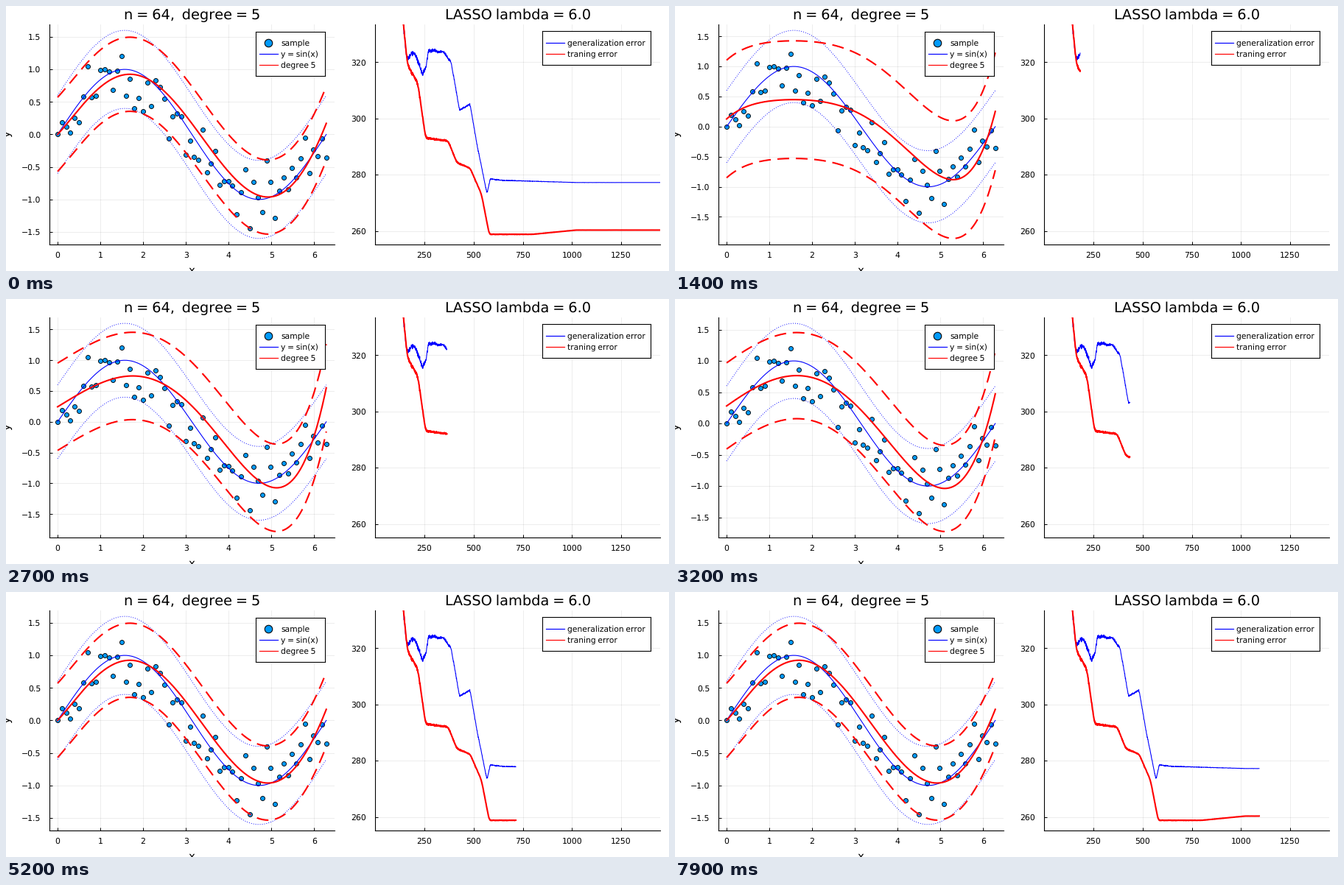
Animation, 900 px wide and 360 px high, one loop 8 s. Source, as a matplotlib script:

```python
import numpy as np
import matplotlib.pyplot as plt
from matplotlib.animation import FuncAnimation

W, H, DPI = 900, 360, 100
FRAMES, STEP, LAST = 80, 14, 1448
TOP, BOTTOM = 24.6, 324.3
PT = 72 / DPI                       # points per pixel
BLUE, RED, DOT = "#0000ff", "#ff0000", "#009afa"

plt.rcParams.update({
    "font.family": "DejaVu Sans",
    "text.hinting": "none",
    "text.kerning_factor": 6,
    "axes.linewidth": 1.1 * PT,
    "axes.axisbelow": True,
})

# step, start value, peak x, peak y, trough x, trough y, end value, band half-width
FIT = np.array([
    (0, 0, 1.0, 0, 5.5, 0, 0, .745),
    (98, .05, 1.0, .07, 5.5, -.515, -.38, .745),
    (240, .18, 1.96, .71, 5.16, -1.135, .69, .745),
    (434, .28, 1.64, .765, 5.10, -1.038, .474, .688),
    (532, .238, 1.57, .84, 5.01, -.982, .347, .652),
    (590, 0, 1.69, .925, 4.92, -.963, .17, .57)])

FALL = [(0, 450), (143, 333.5)]
TRAIN = FALL + [
    (164, 319), (216, 312.5), (256, 293), (370, 292), (415, 284.3),
    (482, 282.3), (540, 273), (579, 258.8), (800, 258.8), (1020, 260.3)]
GENERAL = FALL + [
    (160, 321), (185, 323.5), (210, 322), (240, 315.5), (257, 318),
    (271, 324.3), (347, 323.5), (385, 320), (428, 303), (482, 305),
    (516, 291), (568, 273.2), (584, 278.5), (640, 278), (1025, 277.2)]

rng = np.random.default_rng(7)
steps = np.arange(LAST + 1)
xs = np.linspace(0, 2 * np.pi, 200)
x_data = np.linspace(0, 2 * np.pi, 64)
y_data = np.sin(x_data) + np.clip(.3 * rng.standard_normal(64), -.58, .58)


def error_curve(points, window, jitter):
    """Rounded path through the points, with noise that dies out."""
    y = np.interp(steps, *zip(*points))
    y = np.convolve(np.pad(y, window // 2, mode="edge"),
                    np.ones(window) / window, mode="valid")
    return y + jitter * np.exp(-steps / 250) * rng.standard_normal(steps.size)


train = error_curve(TRAIN, 15, .5)
general = error_curve(GENERAL, 7, 1.1)


def quintic(y0, xa, ya, xb, yb, y1):
    """Degree 5 curve through both ends with flat points at a and b."""
    p = np.arange(6)
    ends = np.vander([0, xa, xb, xs[-1]], 6, increasing=True)
    flat = [p * np.power(float(x), np.maximum(p - 1, 0)) for x in (xa, xb)]
    coef = np.linalg.solve(np.vstack([ends, flat]), [y0, ya, yb, y1, 0, 0])
    return np.polynomial.polynomial.polyval(xs, coef)


def fit_at(step):
    *shape, band = [np.interp(step, FIT[:, 0], col) for col in FIT[:, 1:].T]
    return quintic(*shape), band + 3.15 * np.exp(-(step / 100) ** 1.6)


def box(x0, y0, x1, y1):
    return [x0 / W, 1 - y1 / H, (x1 - x0) / W, (y1 - y0) / H]


def narrow(text):
    """Use quarter-em word spaces."""
    return text.replace(" ", "\u2005")


fig = plt.figure(figsize=(W / DPI, H / DPI), dpi=DPI, facecolor="white")


def plot_axes(title):
    ax = fig.add_axes(box(60, TOP, 440, BOTTOM), label=title)
    ax.spines[["top", "right"]].set_visible(False)
    ax.set_title(narrow(title), fontsize=19.4 * PT, y=1, pad=7 * PT)
    ax.tick_params(direction="in", length=4 * PT, width=1 * PT, labelsize=10.9 * PT)
    ax.tick_params(axis="x", pad=9 * PT)
    ax.tick_params(axis="y", pad=12 * PT)
    ax.grid(color="black", alpha=.1, linewidth=.7 * PT)
    return ax


def line(ax, x, y, color, width, **kw):
    return ax.plot(x, y, color=color, lw=width * PT, **kw)[0]


def dots(ax, x, y, size, edge):
    ax.plot(x, y, "o", ms=size * PT, mfc=DOT, mec="black", mew=edge * PT)


def legend(x0, x1, rows):
    """Framed key; each row is a label with a line colour, or None for a dot."""
    w, h = x1 - x0, 15.2 * len(rows) + 15.2
    ax = fig.add_axes(box(x0, 34.5, x1, 34.5 + h), label=rows[0][0], zorder=5)
    ax.set(xlim=(0, w), ylim=(h, 0), xticks=[], yticks=[])
    for i, (label, color) in enumerate(rows):
        y = 15.2 * (i + 1)
        if color:
            line(ax, [5, 30], [y, y], color, 1.2)
        else:
            dots(ax, [17.3], [y], 10.5, 1.1)
        ax.text(34, y + 4, narrow(label), fontsize=10.8 * PT, va="baseline")
    return ax


left = plot_axes("n = 64,  degree = 5")
left.set(xlim=(-.03 * xs[-1], 1.03 * xs[-1]), xticks=range(7))
left.text(.5, -39.5 / (BOTTOM - TOP), "x", transform=left.transAxes,
          ha="center", va="baseline", fontsize=15 * PT)
fig.text(5 / W, 1 - 174 / H, "y", rotation=90, rotation_mode="anchor",
         ha="center", va="baseline", fontsize=15 * PT)

dots(left, x_data, y_data, 6, .9)
line(left, xs, np.sin(xs), BLUE, 1.1)
for shift in (.6, -.6):
    line(left, xs, np.sin(xs) + shift, BLUE, .9, ls=(0, (1.1, 2.2)))
fit = line(left, xs, xs, RED, 2.1)
upper, lower = [line(left, xs, xs, RED, 2.1, ls=(0, (7.6, 4.3)), dash_capstyle="butt")
                for _ in range(2)]

right = plot_axes("LASSO lambda = 6.0")
right.set(xlim=(0, LAST), ylim=(255.1, 333.5),
          xticks=range(250, 1251, 250), yticks=range(260, 321, 20))
general_line = line(right, [], [], BLUE, 1.1)
train_line = line(right, [], [], RED, 2.1)

left_key = legend(339, 433, [("sample", None), ("y = sin(x)", BLUE),
                             ("degree 5", RED)])
legend(728, 875.3, [("generalization error", BLUE), ("traning error", RED)])


def set_layout(lo, hi):
    """Ticks follow the range; wider labels push the plots to the right."""
    whole = lo < -2
    step = .5 if not whole else 2 if hi - lo > 7 else 1
    ticks = np.arange(np.ceil(lo / step) * step, hi, step)
    left.set_ylim(lo, hi)
    left.set_yticks(ticks, [f"{t:.{0 if whole else 1}f}".replace("-", "\u2212")
                            for t in ticks])
    x0, x1, x2 = (49.5, 441, 496.6) if whole else (59.1, 445.7, 501.3)
    left.set_position(box(x0, TOP, x1, BOTTOM))
    right.set_position(box(x2, TOP, 888, BOTTOM))
    key = left_key.get_position()
    left_key.set_position([(x1 - 106.7) / W, key.y0, key.width, key.height])


def draw(n):
    k = STEP * (n - 1) if n else LAST
    y, band = fit_at(k)
    fit.set_ydata(y)
    upper.set_ydata(y + band)
    lower.set_ydata(y - band)
    lo, hi = min(-1.6, (y - band).min()), max(1.6, (y + band).max())
    pad = .03 * (hi - lo)
    set_layout(lo - pad, hi + pad)
    general_line.set_data(steps[:k + 1], general[:k + 1])
    train_line.set_data(steps[:k + 1], train[:k + 1])
    return fit, upper, lower, general_line, train_line


anim = FuncAnimation(fig, draw, frames=FRAMES, interval=100, repeat=True,
                     repeat_delay=0, blit=False)
plt.show()
```
